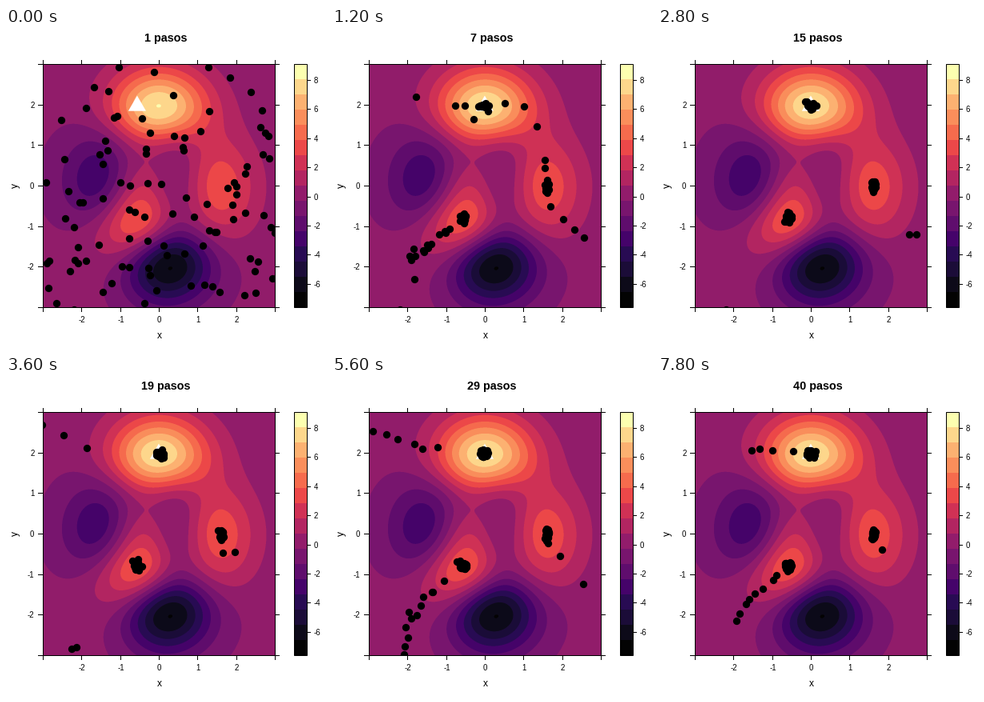
Recreate the animation shown at these times as a matplotlib script. Size 400 by 400 pixels, loop 8 s.

```python
import numpy as np
import matplotlib.pyplot as plt
from matplotlib.animation import FuncAnimation
from matplotlib.colors import to_rgb
from matplotlib.patches import Polygon, Rectangle

SIZE, DPI = 400, 100
PT = 72 / DPI
L, T, R, B = 46, 45, 336, 349
MID = np.array([(L + R + 1) / 2, (T + B + 1) / 2])
UNIT = np.array([(R - L) / 6, (T - B) / 6])
STEPS, INTERVAL = 40, 200

COLORS = ["#030303", "#0d0a19", "#1b0c38", "#280b53", "#45036a", "#5f0d6d",
          "#78156e", "#921c6b", "#b22561", "#d03155", "#ec4849", "#f66b4d",
          "#fa8e5b", "#fcb171", "#fdd78c", "#fcffb0"]
RGB = np.array([to_rgb(c) for c in COLORS])
LOW, HIGH = -7.577, 9.132

# Hill tops of the surface and how far settled walkers jitter around them
HILLS = np.array([(-0.012, 1.977), (1.607, -0.006), (-0.575, -0.787)])
SPREAD = np.array([(0.065, 0.04), (0.025, 0.07), (0.055, 0.055)])
COUNT, SPEED, CATCH = 100, 0.25, 0.35

# Latecomers climb in along two lanes, in waves
UPPER = np.array([(-3.3, 2.7), (-2.3, 2.33), (-1.3, 2.07), HILLS[0]])
LOWER = np.array([(-2.2, -3.2), (-2.0, -2.3), (-1.5, -1.5), HILLS[2]])
WAVES = [  # lane, hill, steps to climb, first and last entry, walkers
    (UPPER, 0, 8.5, 15, 20, 4),
    (LOWER, 2, 10, 18, 22, 4),
    (UPPER, 0, 8.5, 23, 28, 6),
    (LOWER, 2, 10, 22, 28, 9),
    (UPPER, 0, 8.5, 33, 35, 4),
    (LOWER, 2, 10, 31, 36, 8),
]


def peaks(x, y):
    x, y = 0.8 * x, 0.8 * y
    return (3 * (1 - x) ** 2 * np.exp(-x**2 - (y + 1) ** 2)
            - 10 * (x / 5 - x**3 - y**5) * np.exp(-x**2 - y**2)
            - np.exp(-(x + 1) ** 2 - y**2) / 3)


def uphill(p, h=1e-3):
    """Unit vectors of steepest ascent."""
    x, y = p.T
    g = np.c_[peaks(x + h, y) - peaks(x - h, y),
              peaks(x, y + h) - peaks(x, y - h)]
    return g / (np.linalg.norm(g, axis=1, keepdims=True) + 1e-12)


def climb():
    """Walkers scattered at random that step uphill until they reach a top."""
    rng = np.random.default_rng(8)
    pos = rng.uniform(-3, 3, (COUNT, 2))
    home = np.full(COUNT, -1)
    track = [pos]
    for _ in range(STEPS - 1):
        noise = rng.normal(size=pos.shape)
        step = pos + SPEED * uphill(pos) + 0.05 * noise
        gap = np.linalg.norm(step[:, None] - HILLS, axis=2)
        near = np.where(gap.min(axis=1) < CATCH, gap.argmin(axis=1), -1)
        home = np.where(home < 0, near, home)
        rest = HILLS[home] + SPREAD[home] * noise
        pos = np.where((home >= 0)[:, None], rest, step)
        track.append(pos)
    return np.array(track)


def arrive():
    """Latecomers that follow a lane at steady speed, then settle."""
    rng = np.random.default_rng(3)
    steps = np.arange(1, STEPS + 1)
    tracks = []
    for lane, hill, length, first, last, n in WAVES:
        knots = np.linspace(0, 1, len(lane))
        for entry in np.linspace(first, last, n):
            t = np.clip((steps - entry) / length, 0, 1)
            path = np.c_[np.interp(t, knots, lane[:, 0]),
                         np.interp(t, knots, lane[:, 1])]
            wobble = rng.normal(0, 0.05, 2) * (1 - t)[:, None]
            jitter = rng.normal(size=path.shape) * SPREAD[hill]
            tracks.append(path + wobble + jitter * t[:, None])
    return np.stack(tracks, axis=1)


TRACKS = MID + UNIT * np.concatenate([climb(), arrive()], axis=1)


def surface(sub=3):
    """Banded surface, one value per pixel, smoothed at the band edges."""
    w, h = R - L + 1, B - T + 1
    px = L + (np.arange(w * sub) + 0.5) / sub
    py = T + (np.arange(h * sub) + 0.5) / sub
    z = peaks(*np.meshgrid((px - MID[0]) / UNIT[0], (py - MID[1]) / UNIT[1]))
    band = ((z - LOW) / (HIGH - LOW) * len(RGB)).astype(int)
    return RGB[band].reshape(h, sub, w, sub, 3).mean(axis=(1, 3))


def marker(step):
    """White triangle that jumps quickly to the highest top."""
    x, y = MID + UNIT * HILLS[0]
    x -= 27 * 0.3 ** (step - 1)
    angle = np.radians([-90, 30, 150])
    return np.c_[x + 12.8 * np.cos(angle), y + 12.8 * np.sin(angle)]


plt.rcParams["font.family"] = "Liberation Sans"
fig = plt.figure(figsize=(SIZE / DPI, SIZE / DPI), dpi=DPI, facecolor="white")
ax = fig.add_axes([0, 0, 1, 1])


def line(x0, y0, x1, y1):
    ax.plot([x0, x1], [y0, y1], color="black", lw=PT, snap=False,
            solid_capstyle="butt", zorder=6)


def label(x, y, s, size=9.6, **kw):
    return ax.text(x, y, s, fontsize=size * PT, color="black", **kw)


def box(x0, y0, x1, y1):
    ax.add_patch(Rectangle((x0 + 0.5, y0 + 0.5), x1 - x0, y1 - y0, fill=False,
                           ec="black", lw=PT, snap=False, zorder=6))


ax.imshow(surface(), extent=(L, R + 1, B + 1, T), interpolation="nearest",
          aspect="auto", zorder=1)
box(L, T, R, B)
for v in range(-3, 4):
    x, y = np.floor(MID + UNIT * v) + 0.5
    line(x, T - 5, x, T)
    line(x, B + 1, x, B + 6)
    line(L - 6, y, L, y)
    line(R + 1, y, R + 6, y)
    if abs(v) < 3:
        label(x, 368, str(v), ha="center")
        label(35.5, y + 3.5, str(v), ha="right")
label(191.5, 388, "x", 12, ha="center")
label(12, 197.5, "y", 12, ha="center", va="center", rotation=90)

# Colour key
ax.imshow(RGB[::-1, None], extent=(360, 377, B, T), interpolation="nearest",
          aspect="auto", zorder=1)
box(360, T, 376, B)
for v in range(-6, 9, 2):
    y = np.floor(B - (v - LOW) / (HIGH - LOW) * (B - T)) + 0.5
    line(377, y, 381, y)
    label(384.5, y + 3.5, str(v))

title = label(200, 17, "", 14.4, ha="center", weight="bold")
best = Polygon(marker(1), closed=True, fc="white", lw=0, zorder=3)
ax.add_patch(best)
dots = ax.scatter(*TRACKS[0].T, s=(9.3 * PT) ** 2, c="black", linewidths=0,
                  zorder=4)
dots.set_clip_path(Rectangle((L, T), R - L, B - T, transform=ax.transData))

ax.set_xlim(0, SIZE)
ax.set_ylim(SIZE, 0)
ax.axis("off")


def draw(i):
    title.set_text(f"{i + 1} pasos")
    best.set_xy(marker(i + 1))
    dots.set_offsets(TRACKS[i])
    return title, best, dots


anim = FuncAnimation(fig, draw, frames=STEPS, interval=INTERVAL, repeat=True,
                     repeat_delay=0)
plt.show()
```
